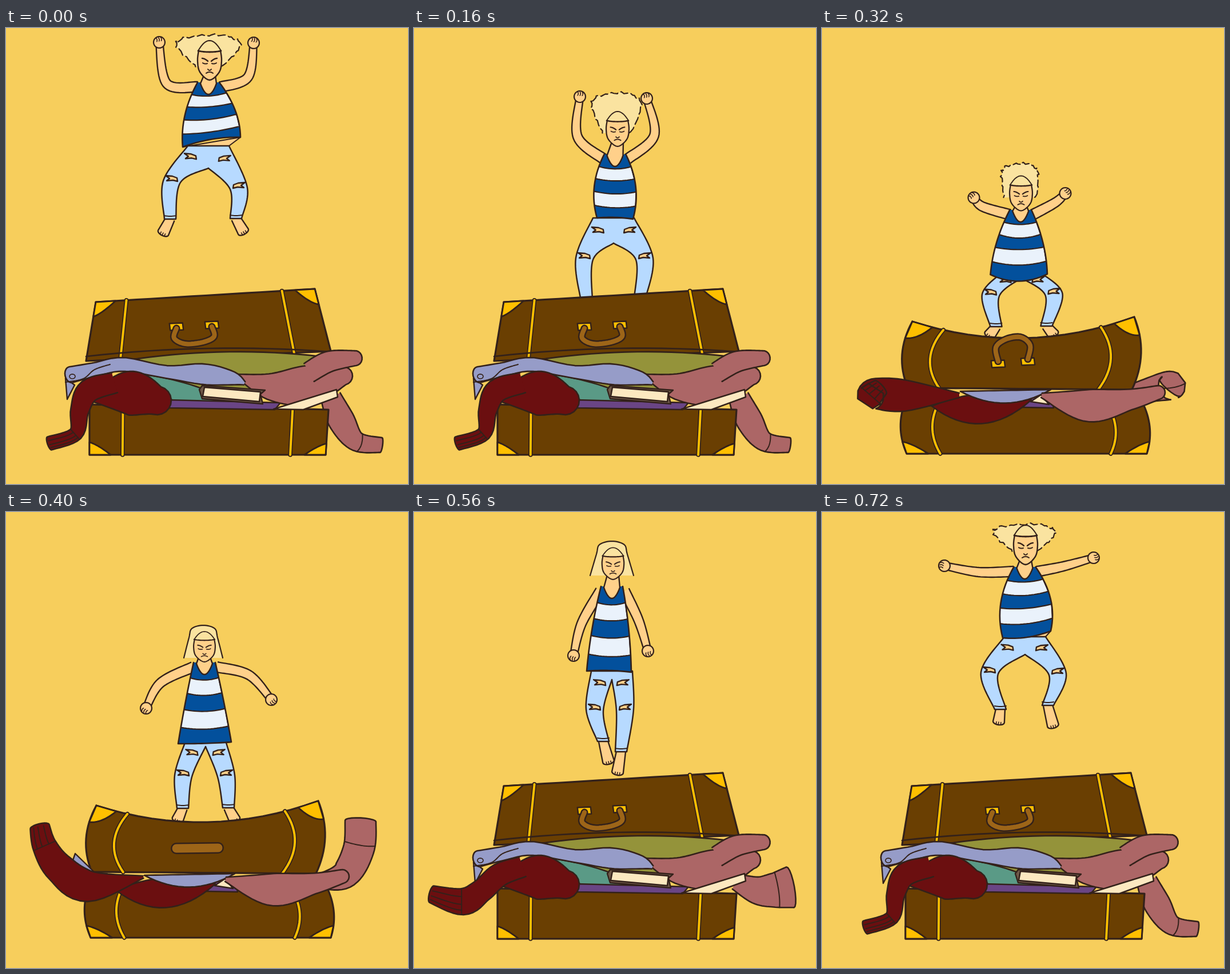
An HTML page with a canvas for the animation above (800 ms loop, 703 by 797 pixels).

```html
<!DOCTYPE html>
<html lang="en">
<head>
<meta charset="utf-8">
<title>Packing the suitcase</title>
<style>
html, body { margin: 0; width: 100%; height: 100%; overflow: hidden; background: #f7ce5c; }
canvas { display: block; }
</style>
</head>
<body>
<canvas id="stage" width="703" height="797"></canvas>
<script>
const ctx = document.getElementById("stage").getContext("2d");
const STEP = 80;
const INK = "#33211a", SKIN = "#ffd08a", HAIR = "#fae3a0", JEANS = "#b7daff", BLUE = "#03509c", WHITE = "#eaf2fb";
const BROWN = "#6a3f02", GOLD = "#ffbf00", TAN = "#9d6518", RED = "#6b0f10", PINK = "#ac6666";
const LILAC = "#969cc8", OLIVE = "#94933a", TEAL = "#5a9a86", PURPLE = "#6a4585", CREAM = "#fce8c0", COVER = "#6e5848";

// ---- geometry: every helper returns a list of points ----

const lerp = (a, b, t) => a + (b - a) * t;
const lerpPoint = (a, b, t) => a.map((v, k) => lerp(v, b[k], t));
const range = n => Array.from({ length: n + 1 }, (_, i) => i / n);
const noise = n => { const s = Math.sin(n * 127.1) * 43758.5; return s - Math.floor(s) - 0.5; };

// Smooth curve through the points p at t from 0 to 1, in any number of dimensions.
function curveAt(p, t) {
  const u = t * (p.length - 1), i = Math.min(p.length - 2, Math.floor(u)), f = u - i;
  const b = p[i], c = p[i + 1], a = p[i - 1] || b, d = p[i + 2] || c;
  return b.map((v, k) => v + 0.5 * f * (c[k] - a[k] + f * (2 * a[k] - 5 * v + 4 * c[k] - d[k]
    + f * (3 * v - 3 * c[k] + d[k] - a[k]))));
}
const smooth = (p, n = 30) => range(n).map(t => curveAt(p, t));

const bowAt = (a, b, dx, dy, t) => {
  const k = 4 * t * (1 - t);
  return [lerp(a[0], b[0], t) + dx * k, lerp(a[1], b[1], t) + dy * k];
};
const bow = (a, b, dx, dy) => range(16).map(t => bowAt(a, b, dx, dy, t));
const oval = (x, y, rx, ry) => range(24).map(t => [x + rx * Math.cos(t * 2 * Math.PI), y + ry * Math.sin(t * 2 * Math.PI)]);

// Points of a ribbon are [x, y, half width]; returns a point across it, side from -1 to 1.
function across(p, t, side, ahead = 0) {
  const [x, y, w] = curveAt(p, t);
  const [x0, y0] = curveAt(p, Math.max(0, t - 0.01)), [x1, y1] = curveAt(p, Math.min(1, t + 0.01));
  const length = Math.hypot(x1 - x0, y1 - y0), dx = (x1 - x0) / length, dy = (y1 - y0) / length;
  return [x + w * (side * dy + ahead * dx), y + w * (ahead * dy - side * dx)];
}

// ---- drawing ----

function pathOf(points) {
  const path = new Path2D();
  points.forEach(([x, y]) => path.lineTo(x, y));
  return path;
}

function stroke(points, width = 2.4, color = INK) {
  ctx.lineWidth = width;
  ctx.strokeStyle = color;
  ctx.stroke(pathOf(points));
}

function paint(fill, points, width = 2.4) {
  ctx.fillStyle = fill;
  ctx.fill(pathOf(points));
  stroke(points, width);
}

const polygon = (fill, ...points) => paint(fill, [...points, points[0]]);
const lens = (fill, a, b, up, down) => paint(fill, [...bow(a, b, 0, up), ...bow(b, a, 0, down)], 2.6);

function ribbon(fill, p, round = 0, width = 2.4) {
  const steps = range(32);
  const cap = range(10).map(t => across(p, 1, Math.cos(t * Math.PI), round * Math.sin(t * Math.PI)));
  paint(fill, [...steps.map(t => across(p, t, 1)), ...cap, ...steps.reverse().map(t => across(p, t, -1))], width);
}

function tube(points, width, color, border) {
  stroke(points, width);
  stroke(points, width - border, color);
}

function local([x, y], angle, scaleX, scaleY, draw) {
  ctx.save();
  ctx.translate(x, y);
  ctx.rotate(angle);
  ctx.scale(scaleX, scaleY);
  draw();
  ctx.restore();
}

// ---- person: joints per pose, left before right ----
// hair: top, half width, half width at the ends; head: x, chin, face height

const poses = {
  flare: {
    head: [356, 91, 52], hair: [12, 55, 22], neck: 95, hem: [[309, 208], [410, 191]], bulge: 9, sag: -5,
    elbows: [[281, 97], [423, 86]], hands: [[268, 25], [433, 26]],
    crotch: [354, 245], knees: [[290, 267], [407, 279]], ankles: [[287, 334], [402, 333]], toes: [[275, 358], [415, 356]]
  },
  drop: {
    head: [356, 207, 46], hair: [113, 43, 24], neck: 221, hem: [[320, 332], [383, 334]], bulge: 11, sag: -2,
    elbows: [[286, 190], [420, 188]], hands: [[290, 120], [407, 123]],
    crotch: [349, 376], knees: [[298, 402], [403, 402]], ankles: [[302, 477], [395, 472]], toes: [[300, 490], [398, 488]]
  },
  crouch: {
    head: [349, 377, 52], hair: [275, 39, 22], neck: 373, hem: [[288, 457], [394, 458]], bulge: 11, sag: 23,
    elbows: [[291, 325], [391, 325]], hands: [[286, 250], [387, 250]],
    crotch: [348, 464], knees: [[280, 471], [426, 468]], ankles: [[300, 526], [396, 525]], toes: [[286, 536], [410, 534]],
    squat: true
  },
  stand: {
    head: [347, 262, 40], hair: [198, 25, 34], neck: 263, hem: [[301, 405], [394, 402]], bulge: 1, sag: 1,
    elbows: [[270, 299], [425, 285]], hands: [[245, 343], [464, 328]],
    crotch: [349, 410], knees: [[310, 460], [385, 460]], ankles: [[309, 518], [389, 517]], toes: [[300, 538], [400, 538]]
  },
  spring: {
    head: [344, 168, 42], hair: [97, 27, 31], neck: 181, hem: [[304, 326], [382, 328]], bulge: 4, sag: 2,
    elbows: [[293, 258], [390, 257]], hands: [[286, 320], [409, 313]],
    crotch: [347, 346], knees: [[317, 395], [378, 395]], ankles: [[319, 460], [383, 464]], toes: [[316, 497], [384, 497]]
  },
  hop: {
    head: [348, 118, 42], hair: [51, 27, 38], neck: 130, hem: [[302, 278], [380, 280]], bulge: 3, sag: -2,
    elbows: [[293, 195], [393, 190]], hands: [[279, 251], [409, 243]],
    crotch: [346, 293], knees: [[316, 345], [369, 345]], ankles: [[331, 401], [362, 419]], toes: [[340, 436], [356, 455]]
  },
  leap: {
    head: [356, 92, 52], hair: [21, 53, 21], neck: 96, hem: [[316, 220], [400, 208]], bulge: 13, sag: 5,
    elbows: [[274, 105], [422, 95]], hands: [[214, 94], [475, 80]],
    crotch: [355, 249], knees: [[293, 280], [412, 282]], ankles: [[312, 345], [395, 338]], toes: [[309, 367], [404, 373]]
  }
};

function drawHair([x, chin], [top, wide, ends]) {
  const fluffy = wide > ends;
  const bottom = chin - (fluffy ? 22 : 7), height = bottom - top;
  const side = [[ends, bottom], [wide, top + height * 0.38], [wide * 0.8, top + height * 0.1], [0, top]];
  const mirrored = side.slice(0, 3).reverse().map(([dx, y]) => [-dx, y]);
  const outline = smooth([...side, ...mirrored], 48).map(([dx, y], i) =>
    fluffy ? [x - 2 + dx + 4 * noise(i), y + 5 * noise(i + 50)] : [x - 2 + dx, y]);
  ctx.setLineDash(fluffy ? [13, 6] : []);
  paint(HAIR, outline, 2.2);
  ctx.setLineDash([]);
}

function drawHead([x, chin, height]) {
  local([x, chin], 0, 0.9 + (height - 40) / 120, height / 52, () => {
    paint(SKIN, smooth([[-19, -52], [-21, -34], [-17, -14], [0, 0], [17, -14], [21, -34], [19, -52]]), 2.4);
    for (const s of [-1, 1]) {
      stroke(bow([s * 13, -38], [s * 3, -33], 0, -1), 2.4);
      stroke(bow([s * 12, -30], [s * 4, -29], 0, 1), 2);
    }
    stroke(bow([-3, -19], [3, -19], 0, 2), 2);
    stroke(bow([-6, -12], [6, -12], 0, -2), 2);
    paint(HAIR, bow([-20, -51], [20, -51], 0, -18), 2);
    stroke(bow([-20, -51], [20, -51], 0, 2), 2.8);
  });
}

function drawArm(shoulder, elbow, hand) {
  ribbon(SKIN, [[...shoulder, 9], [...elbow, 8], [...hand, 6]]);
  local(hand, Math.atan2(hand[1] - elbow[1], hand[0] - elbow[0]), 1, 1, () => {
    paint(SKIN, oval(0, 0, 10, 10), 2.2);
    for (const y of [-4, 0, 4]) stroke(bow([2, y], [8, y], 0, 1), 1.6);
  });
}

function drawFoot(ankle, toe) {
  const foot = [[...ankle, 8], [...toe, 10]];
  ribbon(SKIN, foot, 0.5);
  for (const side of [-0.4, 0, 0.4]) stroke([across(foot, 1, side), across(foot, 1, side, 0.45)], 1.6);
}

function drawRip([x, y], flip) {
  local([x, y], 0, flip, 1, () =>
    polygon(SKIN, [-11, -5], [1, -4], [9, -1], [10, 5], [2, 3], [-9, 4], [-4, 0]));
}

function drawLegs({ crotch, knees, ankles, toes, hem, squat }) {
  const waistY = Math.max(hem[0][1], hem[1][1]) - 2;
  const waist = [[crotch[0] - 36, waistY], [crotch[0] + 36, waistY]];
  ankles.forEach((ankle, i) => drawFoot(ankle, toes[i]));
  if (squat) paint(JEANS, oval(crotch[0], crotch[1] + 28, 62, 29));

  const outline = [0, 1].map(i => {
    const out = i ? 1 : -1, [kx, ky] = knees[i], [ax, ay] = ankles[i];
    return [
      ...smooth([waist[i], [kx + 15 * out, ky], [ax + 10 * out, ay]]),
      ...smooth([[ax - 10 * out, ay], [kx - 15 * out, ky + 3], crotch])
    ];
  });
  paint(SKIN, [...waist, hem[1], hem[0]], 2);
  paint(JEANS, [...outline[0], ...outline[1].reverse(), waist[0]], 2.5);

  [-1, 1].forEach((out, i) => {
    const [x, y] = ankles[i];
    stroke(bow([x - 10, y - 6], [x + 10, y - 6], 0, 1), 2);
    drawRip(lerpPoint([crotch[0] + 17 * out, waistY], knees[i], 0.3), -out);
    drawRip([knees[i][0], knees[i][1] - 4], -out);
  });
}

function drawTop({ head, crotch, neck, hem, bulge, sag }) {
  const x = (head[0] + crotch[0]) / 2 - 1;
  const straps = [[x - 19, neck], [x + 19, neck]];
  const leftAt = t => bowAt(straps[0], hem[0], -bulge, 0, t);
  const rightAt = t => bowAt(straps[1], hem[1], bulge, 0, t);
  const outline = [...range(16).map(leftAt), ...bow(hem[0], hem[1], 0, sag), ...range(16).reverse().map(rightAt)];
  ctx.save();
  ctx.clip(pathOf(outline));
  ctx.fillStyle = BLUE;
  ctx.fill(pathOf(outline));
  for (const [from, to] of [[0.19, 0.38], [0.58, 0.8]])
    paint(WHITE, [...bow(leftAt(from), rightAt(from), 0, 4), ...bow(rightAt(to), leftAt(to), 0, 4 + sag * 0.2)], 2.2);
  ctx.restore();
  stroke(outline, 2.6);

  const throat = [head[0], head[1] - 8];
  paint(SKIN, [[throat[0] - 10, throat[1]], ...bow([x - 14, neck + 2], [x + 14, neck + 2], 0, 19), [throat[0] + 10, throat[1]]]);
}

function drawPerson(pose) {
  const x = (pose.head[0] + pose.crotch[0]) / 2;
  drawHair(pose.head, pose.hair);
  [-21, 21].forEach((dx, i) => drawArm([x + dx, pose.neck + 8], pose.elbows[i], pose.hands[i]));
  drawLegs(pose);
  drawTop(pose);
  drawHead(pose.head);
}

// ---- suitcase: corners run clockwise from the top left ----

function drawShell({ corners, top = 0, side = 0 }, goldRow) {
  const [tl, tr, br, bl] = corners;
  paint(BROWN, [...bow(tl, tr, 0, top), ...bow(tr, br, side, 0), ...bow(br, bl, 0, 0), ...bow(bl, tl, -side, 0)], 3.2);
  for (const [t, out] of [[0.14, -1], [0.85, 1]])
    tube(bow(bowAt(tl, tr, 0, top, t), lerpPoint(bl, br, t), out * side * 1.4, 0), 7.5, GOLD, 3.6);

  const rise = goldRow === "top" ? top : 0;
  const [left, right, farLeft, farRight] = goldRow === "top" ? [tl, tr, bl, br] : [bl, br, tl, tr];
  for (const [from, to, far, out] of [[left, right, farLeft, -1], [right, left, farRight, 1]]) {
    const onRow = bowAt(from, to, 0, rise, 0.09), onSide = bowAt(from, far, out * side, 0, 0.25);
    const inner = lerpPoint(onRow, onSide, 0.5);
    paint(GOLD, [from, onRow, ...bow(onRow, onSide, (from[0] - inner[0]) * 0.1, (inner[1] - from[1]) * 0.3), from], 2.8);
  }
}

function drawHandle({ ends: [a, b], drop }) {
  if (!drop) return tube([a, b], 20, TAN, 5);
  for (const end of [a, b])
    local(end, -0.04, 1, 1, () => polygon(GOLD, [-12, -6], [11, -6], [12, 6], [-11, 6]));
  const side = [[a[0], a[1] + drop * 0.1], [a[0] - 4, a[1] + drop * 0.65], [lerp(a[0], b[0], 0.25), a[1] + drop * 0.97]];
  const other = side.map(([x, y]) => [a[0] + b[0] - x, y + b[1] - a[1]]).reverse();
  tube(smooth([...side, ...other]), 13, TAN, 5);
}

const open = {
  lid: { corners: [[157, 479], [540, 456], [568, 565], [140, 582]] },
  base: { corners: [[146, 658], [564, 667], [559, 746], [146, 746]] },
  handle: { ends: [[298, 522], [360, 519]], drop: 31 },
  drawContents() {
    stroke(bow([140, 574], [568, 566], 0, -10), 2.6);
    lens(OLIVE, [230, 578], [550, 574], -10, 62);
    lens(TEAL, [228, 604], [395, 652], -8, 30);
    polygon(PURPLE, [285, 650], [480, 655], [470, 667], [285, 664]);
    ribbon(PINK, [[405, 608, 3], [465, 627, 24], [530, 624, 34], [590, 608, 16]], 1, 2.6);
    ribbon(PINK, [[530, 602, 18], [565, 583, 18], [611, 577, 13]], 0.9, 2.6);
    polygon(COVER, [338, 632], [343, 625], [453, 633], [445, 640], [449, 657], [343, 648]);
    polygon(CREAM, [347, 628], [445, 636], [443, 653], [344, 644]);
    polygon(CREAM, [468, 666], [578, 632], [580, 645], [520, 667]);
    polygon(LILAC, [104, 612], [107, 649], [120, 624]);
    ribbon(LILAC, [[417, 621, 3], [395, 612, 12], [345, 605, 18], [280, 601, 11], [205, 588, 12], [155, 597, 12], [113, 606, 14]], 0.7, 2.6);
    stroke(smooth([[104, 619], [135, 613], [155, 597], [182, 588]]), 2);
    stroke(oval(116, 609, 5, 4), 1.6);
    ribbon(RED, [[150, 645, 8], [215, 638, 38], [264, 651, 25]], 1, 2.6);
  }
};

const squashed = {
  lid: { corners: [[158, 513], [546, 505], [542, 632], [150, 629]], top: 33, side: 14 },
  base: { corners: [[143, 660], [563, 660], [568, 744], [148, 744]], side: 8 },
  handle: { ends: [[308, 587], [360, 583]], drop: -44 },
  drawContents() {
    polygon(PURPLE, [300, 640], [400, 640], [405, 664], [300, 662]);
    polygon(CREAM, [365, 653], [383, 641], [397, 658]);
    lens(RED, [192, 661], [366, 650], -16, 36);
    lens(LILAC, [242, 635], [400, 632], 0, 22);
    ribbon(PINK, [[384, 642, 4], [465, 660, 28], [540, 649, 18], [588, 637, 12]], 1, 2.6);
  }
};

const flattened = {
  ...squashed,
  handle: { ends: [[298, 588], [371, 587]], drop: 0 },
  drawContents() {
    polygon(LILAC, [114, 617], [121, 597], [155, 630]);
    squashed.drawContents();
  }
};

const bulging = {
  lid: { corners: [[154, 520], [567, 517], [560, 627], [154, 632]], top: -27, side: 5 },
  base: { corners: [[150, 660], [562, 655], [561, 745], [150, 745]], side: 4 },
  handle: { ends: [[309, 557], [382, 554]], drop: 43 },
  drawContents() {
    polygon(PURPLE, [320, 656], [345, 640], [540, 648], [540, 656]);
    polygon(COVER, [345, 644], [360, 638], [448, 650], [446, 656]);
    polygon(CREAM, [355, 641], [372, 629], [447, 646], [447, 652]);
    lens(LILAC, [255, 632], [400, 627], -2, 6);
    lens(RED, [208, 661], [367, 627], -8, 24);
    ribbon(PINK, [[400, 627, 2], [480, 638, 15], [545, 639, 14], [588, 638, 11]], 1, 2.6);
    polygon(LILAC, [111, 635], [115, 611], [126, 619], [155, 632]);
  }
};

// Centre lines of the loose ends: x, y, half width.
const limbs = {
  hang: {
    sock: [[190, 620, 18], [145, 634, 20], [129, 668, 16], [122, 709, 12], [76, 726, 12]],
    sleeve: [[568, 645, 18], [586, 685, 23], [612, 722, 17], [656, 729, 13]]
  },
  fling: {
    sock: [[190, 620, 18], [150, 634, 20], [118, 662, 20], [85, 681, 23], [31, 668, 15]],
    sleeve: [[562, 646, 14], [600, 661, 24], [630, 661, 30], [658, 656, 36]]
  },
  fold: {
    sock: [[240, 646, 6], [148, 631, 27], [94, 655, 27], [103, 701, 22], [145, 706, 14]],
    sleeve: [[545, 632, 22], [600, 620, 24], [605, 662, 22], [596, 718, 18]]
  },
  rise: {
    sock: [[240, 638, 2], [145, 654, 27], [94, 623, 26], [68, 585, 21], [59, 550, 17]],
    sleeve: [[545, 646, 12], [592, 634, 24], [617, 588, 27], [620, 540, 27]]
  },
  trail: {
    sock: [[255, 633, 8], [180, 652, 20], [115, 659, 25], [70, 655, 23], [34, 637, 14]],
    sleeve: [[556, 645, 12], [598, 646, 24], [630, 622, 26], [650, 588, 25]]
  }
};

function drawSleeve(p) {
  ribbon(PINK, p, 0.2, 2.6);
  stroke(bow(across(p, 0.72, -1), across(p, 0.72, 1), 3, 3), 2);
}

function drawSock(p) {
  ribbon(RED, p, 0.3, 2.6);
  stroke([across(p, 0.76, -1), across(p, 0.76, 1)], 2);
  for (const side of [-0.4, 0.2, 0.65]) stroke(range(8).map(t => across(p, lerp(0.76, 1, t), side)), 2);
}

function drawCase(bag, limb) {
  drawSleeve(limb.sleeve);
  drawShell(bag.base, "bottom");
  drawShell(bag.lid, "top");
  drawHandle(bag.handle);
  bag.drawContents();
  drawSock(limb.sock);
}

// ---- animation ----

function halfway(a, b) {
  if (typeof a === "number") return (a + b) / 2;
  if (Array.isArray(a)) return a.map((v, i) => halfway(v, b[i]));
  const result = {};
  for (const key in a) if (key in b) result[key] = halfway(a[key], b[key]);
  return result;
}

const { flare, drop, crouch, stand, spring, hop, leap } = poses;
const { hang, fling, fold, rise, trail } = limbs;
const scenes = [
  [flare, open, hang],
  [halfway(flare, drop), open, hang],
  [drop, open, hang],
  [crouch, squashed, fold],
  [halfway(crouch, stand), squashed, halfway(fold, rise)],
  [stand, flattened, rise],
  [spring, bulging, trail],
  [hop, open, fling],
  [halfway(hop, leap), open, halfway(fling, hang)],
  [leap, open, hang]
];

ctx.lineCap = ctx.lineJoin = "round";
const start = performance.now();
let shown = -1;

function frame(now) {
  const index = Math.floor(Math.max(0, now - start) / STEP) % scenes.length;
  if (index !== shown) {
    shown = index;
    const [pose, bag, limb] = scenes[index];
    ctx.fillStyle = "#f7ce5c";
    ctx.fillRect(0, 0, 703, 797);
    drawPerson(pose);
    drawCase(bag, limb);
  }
  requestAnimationFrame(frame);
}
frame(start);
</script>
</body>
</html>
```
